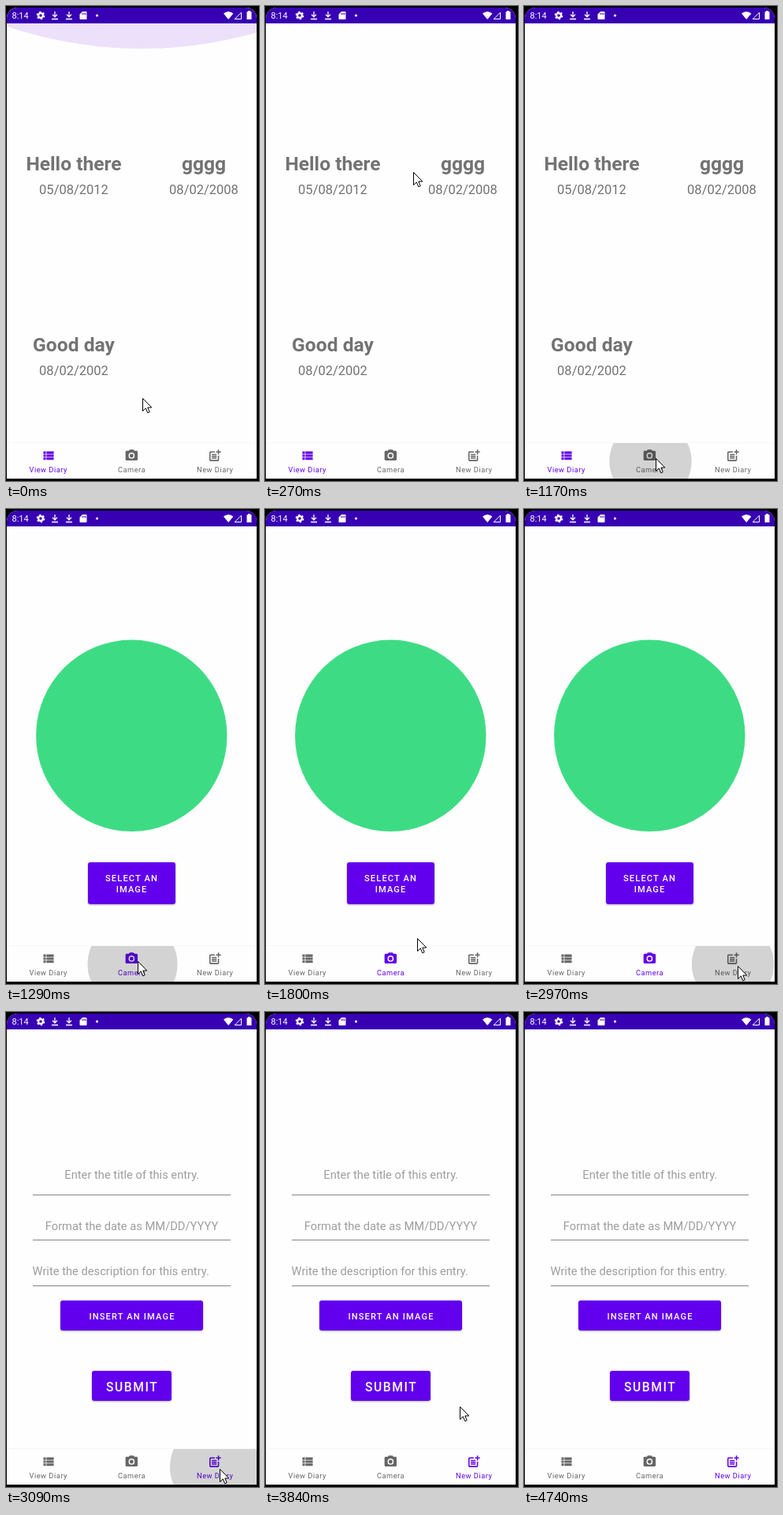
Animation, 321 px wide and 601 px high, one loop 5930 ms. Source, as an HTML page:

```html
<!DOCTYPE html>
<html lang="en">
<head>
<meta charset="utf-8">
<title>Diary app</title>
<style>
html, body { margin: 0; width: 100%; height: 100%; overflow: hidden; background: #000; }
svg { display: block; width: 321px; height: 601px; font-family: Roboto, sans-serif; }
.mid { text-anchor: middle; }
.title { font-weight: 700; font-size: 24.6px; }
.date { font-size: 16.5px; }
.hint { font-size: 14.7px; fill: #9e9e9e; }
.left { text-anchor: start; }
.btn { font-weight: 500; font-size: 11.1px; letter-spacing: 1.15px; fill: #fff; }
.big { font-size: 15.6px; letter-spacing: 1.6px; }
.tab text { font-size: 9.25px; letter-spacing: .5px; text-anchor: middle; }
</style>
</head>
<body>
<svg viewBox="0 0 321 601">
  <defs>
    <clipPath id="screen"><path d="M1 598V16A14 14 0 0 1 15 2H304A14 14 0 0 1 318 16V598Z"/></clipPath>
    <clipPath id="bar"><rect x="1" y="553" width="317" height="45"/></clipPath>
    <filter id="lift" x="-10%" y="-20%" width="120%" height="150%">
      <feDropShadow dx="0" dy="1" stdDeviation=".8" flood-opacity=".3"/>
    </filter>
  </defs>
  <rect width="321" height="601"/>
  <g clip-path="url(#screen)">
    <rect width="321" height="601" fill="#fefefe"/>
    <circle id="glow" cx="172" cy="-476" r="530" fill="#ece0fb"/>
    <rect width="321" height="22" fill="#3700b3"/>

    <g fill="#fff">
      <text x="7.5" y="16" font-size="11">8:14</text>
      <g fill="none" stroke="#fff">
        <circle cx="44" cy="12" r="2.9" stroke-width="2.2"/>
        <circle cx="44" cy="12" r="4.6" stroke-width="1.5" stroke-dasharray="2.4 2.42"/>
        <path id="load" d="M62 7v6M59 10.8l3 3 3-3M58 16.5h8" stroke-width="1.3"/>
        <use href="#load" x="18"/>
        <path d="M298.5 8.2v8.3h-8.3z"/>
      </g>
      <path fill-rule="evenodd" d="M97 7h4.5q1 0 1 1v8q0 1-1 1h-7q-1 0-1-1v-5.5zM96.5 9v2h1V9zm2 0v2h1V9zm2 0v2h1V9z"/>
      <circle cx="115.5" cy="12" r="1.6"/>
      <path d="M276 9.5q6.2-5 12.4 0L282.2 17z"/>
      <path d="M307 6h3v1.2h1.5V17h-6V7.2h1.5z"/>
    </g>

    <g class="page mid" fill="#737373">
      <text class="title" x="86" y="208">Hello there</text>
      <text class="date" x="86" y="238">05/08/2012</text>
      <text class="title" x="251" y="208">gggg</text>
      <text class="date" x="251" y="238">08/02/2008</text>
      <text class="title" x="86" y="437">Good day</text>
      <text class="date" x="86" y="467">08/02/2002</text>
    </g>

    <g class="page mid">
      <circle cx="159.3" cy="286.8" r="121.2" fill="#3ddc84"/>
      <rect x="104" y="447" width="111" height="53" rx="3" fill="#6200ee" filter="url(#lift)"/>
      <text class="btn" x="159.6" y="471">SELECT AN</text>
      <text class="btn" x="159.6" y="484.5">IMAGE</text>
    </g>

    <g class="page mid">
      <text class="hint" x="159.8" y="211">Enter the title of this entry.</text>
      <text class="hint" x="159.5" y="276">Format the date as MM/DD/YYYY</text>
      <text class="hint left" x="33.5" y="332.5">Write the description for this entry.</text>
      <path d="M34 231.5H285M34 288.5H285M34 346.5H285" stroke="#858585"/>
      <g fill="#6200ee" filter="url(#lift)">
        <rect x="69" y="365" width="181" height="38" rx="3"/>
        <rect x="109" y="454" width="101" height="38" rx="3"/>
      </g>
      <text class="btn" x="160" y="388.5">INSERT AN IMAGE</text>
      <text class="btn big" x="160.2" y="479.5">SUBMIT</text>
    </g>

    <path d="M1 552.5H318" stroke="#f6f6f6"/>
    <g class="tab">
      <path transform="translate(44.4 559.7) scale(.771)" d="M4 14h4v-4H4v4zm0 5h4v-4H4v4zM4 9h4V5H4v4zm5 5h12v-4H9v4zm0 5h12v-4H9v4zM9 5v4h12V5H9z"/>
      <text x="53.7" y="590">View Diary</text>
    </g>
    <g class="tab">
      <path transform="translate(150.1 559.7) scale(.771)" d="M9 2L7.2 4H4c-1.1 0-2 .9-2 2v12c0 1.1.9 2 2 2h16c1.1 0 2-.9 2-2V6c0-1.1-.9-2-2-2h-3.2L15 2H9zm3 15a5 5 0 1 1 0-10 5 5 0 0 1 0 10zM12 8.8a3.2 3.2 0 1 0 0 6.4 3.2 3.2 0 0 0 0-6.4z"/>
      <text x="159.5" y="590">Camera</text>
    </g>
    <g class="tab">
      <path transform="translate(255.7 559.7) scale(.771)" d="M17 19H5V7h7V5H5c-1.1 0-2 .9-2 2v12c0 1.1.9 2 2 2h12c1.1 0 2-.9 2-2v-7h-2zM19 2h-2v3h-3v2h3v3h2V7h3V5h-3zM7 9h8v2H7zM7 12h8v2H7zM7 15h8v2H7z"/>
      <text x="265.2" y="590">New Diary</text>
    </g>
    <g clip-path="url(#bar)"><circle id="ripple" cy="576"/></g>
  </g>
  <path id="cursor" d="M.5.5V16.5L4.3 12.9 6.8 18.8 9.2 17.7 6.8 12H11.8Z" fill="#fff" stroke="#000"/>
</svg>
<script>
const LOOP = 5930;
const BEAT = 128; // screen refresh interval, ms
const SWITCHES = [10, 24]; // beats at which a tapped tab opens
const EXIT = 37; // beat at which the pointer has left

const $ = id => document.getElementById(id);
const pages = document.querySelectorAll('.page');
const tabs = document.querySelectorAll('.tab');
const clamp = v => Math.min(1, Math.max(0, v));

// Pointer turns: beat, x, y
const turns = [
  [0, 173, 496], [2, 188, 210], [4, 186, 316], [5, 181, 570], [7, 167, 574],
  [12, 167, 570], [14, 193, 543], [16, 286, 577], [18, 272, 580],
  [27, 270, 577], [30, 247, 499], [32, 243, 461], [34, 275, 510], [36, 234, 582]
];

function pointerAt(beat) {
  const next = turns.findIndex(p => p[0] > beat);
  if (next < 0) return turns.at(-1).slice(1);
  const [b0, x0, y0] = turns[next - 1];
  const [b1, x1, y1] = turns[next];
  const k = (beat - b0) / (b1 - b0);
  return [x0 + (x1 - x0) * k, y0 + (y1 - y0) * k].map(Math.round);
}

// The ripple spreads for two beats before the tab opens, then fades
function drawRipple(beat) {
  const i = SWITCHES.findIndex(s => beat > s - 3 && beat < s + 3);
  const age = i < 0 ? 0 : beat - SWITCHES[i];
  const rest = 1 - clamp((age + 2.7) / 2.4);
  const ripple = $('ripple');
  ripple.setAttribute('cx', i ? 265 : 160.5);
  ripple.setAttribute('r', 57 * (1 - rest * rest));
  ripple.setAttribute('opacity', i < 0 ? 0 : .17 * (1 - clamp(age / 3)));
}

function render(time) {
  const beat = Math.floor(time / BEAT);
  const open = SWITCHES.filter(s => beat >= s).length;
  pages.forEach((page, i) => {
    page.style.display = i === open ? '' : 'none';
    tabs[i].setAttribute('fill', i === open ? '#6200ee' : '#666');
  });
  $('glow').style.display = beat < 2 ? '' : 'none';
  $('cursor').style.display = beat < EXIT ? '' : 'none';
  $('cursor').setAttribute('transform', `translate(${pointerAt(beat)})`);
  drawRipple(beat);
}

const begin = performance.now();
function tick() {
  render((performance.now() - begin) % LOOP);
  requestAnimationFrame(tick);
}
tick();
</script>
</body>
</html>
```
